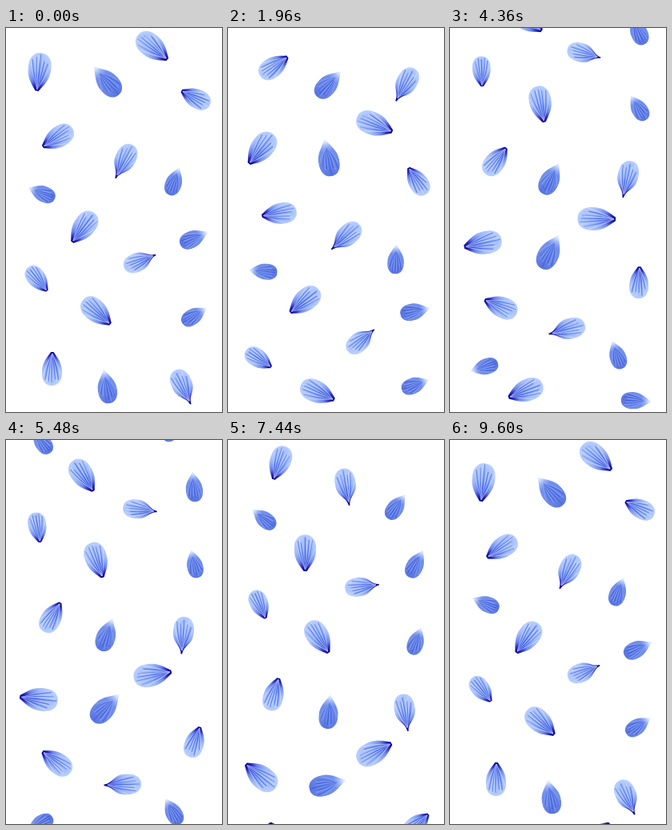
Write an HTML page with a canvas that moves like this. It is 270 by 480 pixels and loops after 9.64 s.

```html
<!DOCTYPE html>
<html lang="en">
<head>
<meta charset="utf-8">
<title>Falling petals</title>
<style>
html, body { margin: 0; width: 100%; height: 100%; overflow: hidden; background: #fff; }
canvas { display: block; width: 270px; height: 480px; }
</style>
</head>
<body>
<canvas id="stage" width="270" height="480"></canvas>
<script>
const LOOP = 9640, STEP = 40, FALL = 49.2;
const CW = 1, CCW = -1;
const ctx = document.getElementById('stage').getContext('2d');

// neck: half width at the tip; taper: Bezier handles towards the widest point.
// colors run from the tip to the round end, at the distances in reach.
const darkTip = ['#05009c', '#1813b8', '#4c6ae6', '#82a2f7', '#b4ccff'];
const kinds = {
  fan: {
    aspect: 0.6, neck: 0.14, taper: [0.72, 0.42, 0.42, 1], root: 0.9,
    colors: darkTip, reach: [0.08, 0.16, 0.3, 0.55, 1], pale: 0.4,
    dark: 'rgba(45,80,225,0.55)', light: 'rgba(214,228,255,0.6)'
  },
  stem: {
    aspect: 0.55, neck: 0.06, taper: [0.48, 0.14, 0.5, 1], root: 0.8,
    colors: darkTip, reach: [0.1, 0.2, 0.32, 0.55, 1], pale: 0.4,
    dark: 'rgba(45,80,225,0.5)', light: 'rgba(214,228,255,0.6)'
  },
  drop: {
    aspect: 0.56, neck: 0.03, taper: [0.62, 0.36, 0.32, 1], root: 0.5,
    colors: ['#eff4ff', '#d4e1fd', '#9ab4f6', '#6a89ea', '#5672e0'], reach: [0, 0.09, 0.2, 0.36, 1], pale: 0.12,
    dark: 'rgba(42,66,205,0.5)', light: 'rgba(150,180,252,0.5)'
  }
};

// Where each petal rests as the loop closes: x, y, tip angle, length, turn, extra fall.
const homes = {
  fan: [
    [41.5, 55, 97, 48, CW], [183.5, 24, 40, 48, CCW], [237, 87.5, 207, 40, CW, 4],
    [64.5, 137, 148, 44, CW], [96.5, 249.5, 127, 46, CW], [39.5, 314, 51, 38, CCW],
    [113.5, 355, 42, 46, CCW], [57.5, 426, 271, 42, CCW]
  ],
  stem: [[147.5, 167, 117, 47, CW], [167.5, 291.5, -22, 43, CCW], [221.5, 449, 66, 47, CCW]],
  drop: [
    [125.5, 66, 228, 47, CW], [210.5, 191.5, 290, 37, CCW], [44.5, 206.5, 203, 36, CCW],
    [235, 263, -25, 38, CW], [235.5, 359.5, -33, 36, CW], [126, 448, 260, 43, CCW]
  ]
};

function arrival([, , , , turn]) {
  return { fall: FALL, spin: turn === CW ? 17 : -7, side: 0 };
}

// The lower the resting place, the more the fall and spin change on the way out.
function departure([, y, , , turn, extra = 0]) {
  const depth = y / 360;
  return {
    fall: FALL + extra + (turn === CW ? -5 : 2) * depth ** 2,
    spin: turn === CW ? Math.max(6, 19 - 17 * depth) : -9,
    side: -0.7 * depth
  };
}

function seeded(seed) {
  return () => {
    seed = (seed * 16807) % 2147483647;
    return seed / 2147483647;
  };
}

function outline(h, w, neck, [ax, ay, bx, by]) {
  const path = new Path2D();
  path.moveTo(h, -neck * w);
  path.bezierCurveTo(ax * h, -ay * w, bx * h, -by * w, -0.22 * h, -w);
  path.bezierCurveTo(-0.72 * h, -w, -h, -0.6 * w, -h, 0);
  path.bezierCurveTo(-h, 0.6 * w, -0.72 * h, w, -0.22 * h, w);
  path.bezierCurveTo(bx * h, by * w, ax * h, ay * w, h, neck * w);
  path.closePath();
  return path;
}

function drawVeins(kind, h, w, random) {
  const count = 11;
  for (let i = 0; i < count; i++) {
    const spread = (2 * (i + 0.6 * random() + 0.2)) / count - 1;
    const end = 0.6 + 0.35 * random() - 0.4 * spread ** 2;
    ctx.strokeStyle = i % 2 ? kind.dark : kind.light;
    ctx.lineWidth = 0.7 + 0.8 * random();
    ctx.beginPath();
    ctx.moveTo(kind.root * h, 0);
    ctx.quadraticCurveTo(0.2 * h, 0.65 * spread * w, -end * h, 0.95 * spread * w);
    ctx.stroke();
  }
}

function drawPetal(kind, [x, y, tip, length], { fall, spin, side }, seconds) {
  const cy = y + fall * seconds;
  if (cy < -30 || cy > 510) return;
  const h = length / 2, w = h * kind.aspect;
  const path = outline(h, w, kind.neck, kind.taper);
  const body = ctx.createRadialGradient(h, 0, 0, h, 0, length);
  kind.colors.forEach((color, i) => body.addColorStop(kind.reach[i], color));
  const edges = ctx.createLinearGradient(0, -w, 0, w);
  [kind.pale, 0, kind.pale].forEach((alpha, i) => edges.addColorStop(i / 2, `rgba(225,236,255,${alpha})`));

  ctx.save();
  ctx.translate(x + side * seconds, cy);
  ctx.rotate((tip + spin * seconds) * Math.PI / 180);
  ctx.clip(path);
  for (const paint of [body, edges]) {
    ctx.fillStyle = paint;
    ctx.fillRect(-h, -w, length, 2 * w);
  }
  drawVeins(kind, h, w, seeded(Math.round(x * 97 + y)));
  ctx.restore();
}

function frame(now) {
  const time = Math.floor((now % LOOP) / STEP) * STEP;
  ctx.fillStyle = '#fff';
  ctx.fillRect(0, 0, 270, 480);
  for (const name in homes) {
    for (const home of homes[name]) {
      drawPetal(kinds[name], home, arrival(home), (time - LOOP) / 1000);
      drawPetal(kinds[name], home, departure(home), time / 1000);
    }
  }
}

const start = performance.now();
function tick() {
  frame(performance.now() - start);
  requestAnimationFrame(tick);
}
tick();
</script>
</body>
</html>
```
